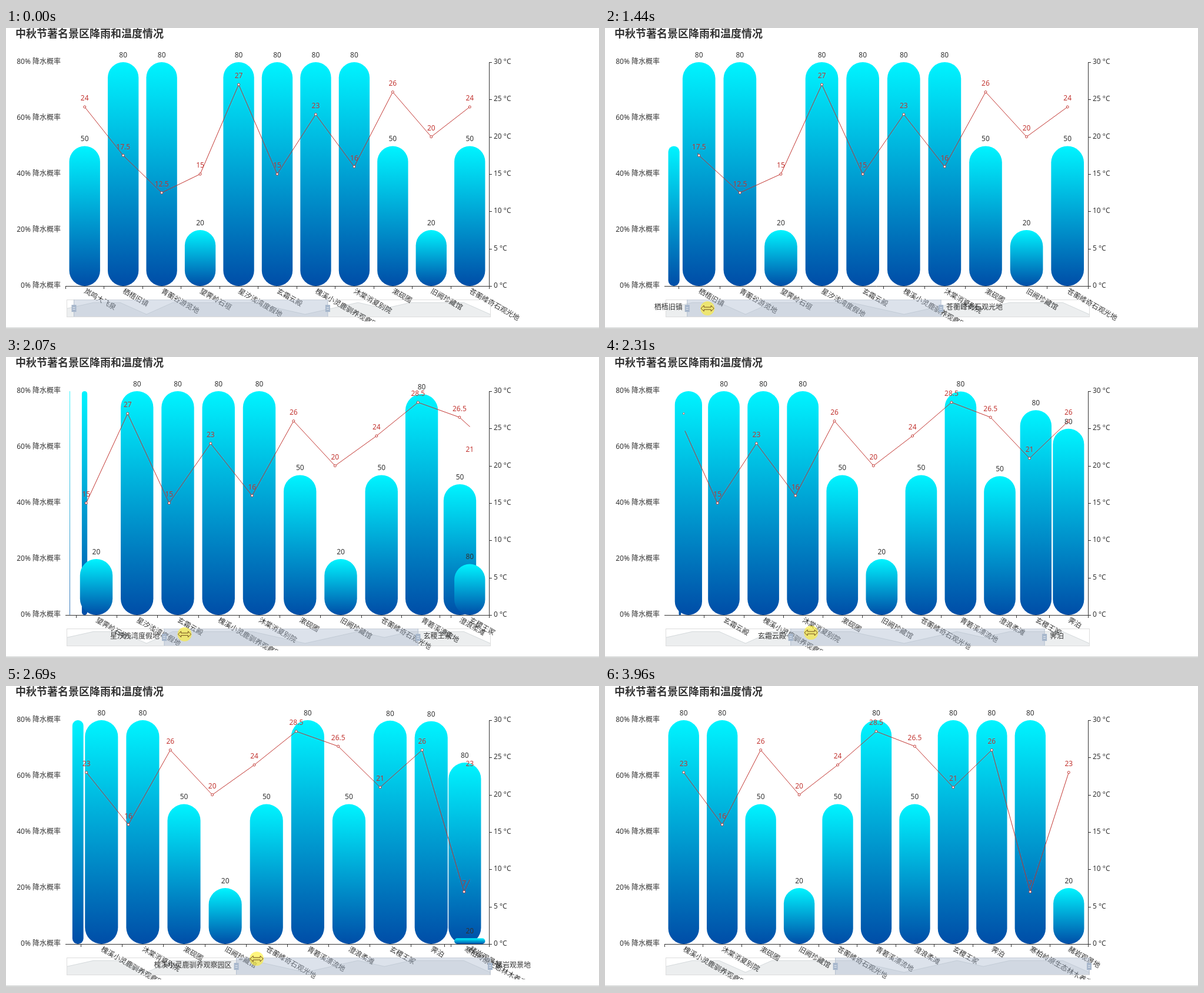
Animation of 1008x511 px, one loop 4.72 s. Source, as an HTML page with a canvas:

```html
<!DOCTYPE html>
<html lang="zh">
<head>
<meta charset="utf-8">
<style>
html, body { margin: 0; width: 100%; height: 100%; overflow: hidden; background: #fff; }
canvas { display: block; }
</style>
</head>
<body>
<canvas id="stage" width="1008" height="511"></canvas>
<script>
const ctx = document.getElementById('stage').getContext('2d');
const LOOP = 4720, UPDATE = 400;
const FONT = '"Noto Sans", "Noto Sans CJK SC", "Noto Sans CJK", sans-serif';
const INK = '#333', RED = '#c23531';
const LEFT = 101, WIDTH = 720, TOP = 58, BASE = 438;
const SLIDER = { x: 104, y: 461, w: 719, h: 29 };

const places = [
  ['岚鸣大飞泉', 50, 24], ['栖梧旧镇', 80, 17.5], ['青蘅谷游览地', 80, 12.5],
  ['望霁岭石垣', 20, 15], ['星汐浅湾度假地', 80, 27], ['玄霜云殿', 80, 15],
  ['槐溪小灵鹿驯养观察园区', 80, 23], ['沐棠消夏别院', 80, 16], ['漱砚圃', 50, 26],
  ['旧阙珍藏馆', 20, 20], ['苍蘅峰奇石观光地', 50, 24], ['青箬溪漂流地', 80, 28.5],
  ['澄浪柔滩', 50, 26.5], ['玄稷王冢', 80, 21], ['霁泊', 80, 26],
  ['寒柏岭原生态林木养育带', 80, 7], ['赭岩观景地', 20, 23]
].map(([name, rain, temp]) => ({ name, rain, temp }));

// [time, first visible place, last visible place]
const views = [
  [-1e4, 0, 10], [1327, 1, 10], [1602, 1, 11], [1768, 2, 12], [1895, 3, 12], [2038, 3, 13],
  [2073, 4, 13], [2124, 4, 14], [2293, 5, 14], [2495, 5, 15], [2571, 6, 15], [2677, 6, 16]
].map(([time, a, b]) => ({ time, a, b }));

// [time, x, y] of the pointer
const pointer = [
  [300, 150, 510], [760, 137, 477], [1060, 138, 477], [1330, 159, 477], [1440, 174, 476],
  [1770, 245, 474], [2310, 350, 468], [2690, 426, 463], [3000, 465, 462], [3160, 483, 462],
  [3480, 549, 462], [3960, 549, 462]
];

const mix = (a, b, p) => a + (b - a) * p;
const clamp = (v, lo, hi) => Math.min(hi, Math.max(lo, v));
const easeOut = v => 1 - (1 - clamp(v, 0, 1)) ** 3;
const band = v => WIDTH / (v.b - v.a + 1);
const slotX = (v, i) => LEFT + band(v) * (i - v.a + .5);
const inView = (v, i) => i >= v.a && i <= v.b;
const tempY = i => BASE - places[i].temp * 380 / 30;

function text(s, x, y, align = 'left', color = INK, font = '12px') {
  ctx.font = `${font} ${FONT}`;
  ctx.textAlign = align;
  ctx.textBaseline = 'middle';
  ctx.fillStyle = color;
  ctx.fillText(s, x, y);
}

function path(points, color, width = 1) {
  ctx.beginPath();
  points.forEach(([x, y]) => ctx.lineTo(x, y));
  ctx.strokeStyle = color;
  ctx.lineWidth = width;
  ctx.stroke();
}

function pointerAt(t) {
  const k = pointer.findIndex(q => q[0] > t);
  if (k < 1) return k ? pointer[pointer.length - 1].slice(1) : pointer[0].slice(1);
  const [t0, x0, y0] = pointer[k - 1], [t1, x1, y1] = pointer[k];
  const p = (t - t0) / (t1 - t0);
  return [mix(x0, x1, p), mix(y0, y1, p)];
}

// Each new view restarts the bars from wherever they are.
function barsAt(t) {
  let live = {};
  const leaving = [];
  views.filter(v => v.time <= t).forEach((v, k) => {
    const until = Math.min(t, views[k + 1] ? views[k + 1].time : t);
    const p = easeOut((until - v.time) / UPDATE);
    const next = {};
    for (let i = v.a; i <= v.b; i++) {
      const goal = { x: slotX(v, i), w: band(v) * .8, h: places[i].rain * 4.75 };
      const from = live[i] || { ...goal, h: 0 };
      next[i] = { x: mix(from.x, goal.x, p), w: mix(from.w, goal.w, p), h: mix(from.h, goal.h, p) };
    }
    for (const i in live) {
      if (!next[i]) leaving.push({ ...live[i], left: 1 - easeOut((t - v.time) / UPDATE) });
    }
    live = next;
  });
  return { live, leaving };
}

function drawBar(x, w, h) {
  if (w < .3 || h < .3) return;
  const fill = ctx.createLinearGradient(0, BASE - h, 0, BASE);
  fill.addColorStop(0, 'rgb(0,244,255)');
  fill.addColorStop(1, 'rgb(0,77,167)');
  ctx.fillStyle = fill;
  ctx.beginPath();
  ctx.roundRect(x, BASE - h, w, h, Math.min(w, h) / 2);
  ctx.fill();
}

function drawAxes(live) {
  for (let k = 0; k <= 4; k++) text(`${k * 20}% 降水概率`, 93, BASE - k * 95, 'right');
  path([[821.5, TOP], [821.5, BASE]], INK);
  for (let k = 0; k <= 6; k++) {
    const y = Math.round(BASE - k * 380 / 6) + .5;
    path([[821, y], [826, y]], INK);
    text(`${k * 5} °C`, 829, y - .5);
  }
  path([[LEFT, BASE + .5], [822, BASE + .5]], INK);
  const tick = x => path([[Math.round(x) + .5, BASE], [Math.round(x) + .5, BASE + 5]], INK);
  tick(821);
  ctx.save();
  ctx.beginPath();
  ctx.rect(0, 0, 1008, 498);
  ctx.clip();
  for (const i in live) {
    tick(live[i].x - live[i].w / 1.6);
    ctx.save();
    ctx.translate(live[i].x, BASE + 8);
    ctx.rotate(Math.PI / 6);
    text(places[i].name, 0, 0);
    ctx.restore();
  }
  ctx.restore();
}

function marker(x, y, scale) {
  if (scale < .05) return;
  ctx.beginPath();
  ctx.arc(x, y, 2 * scale, 0, 7);
  ctx.fillStyle = '#fff';
  ctx.fill();
  ctx.strokeStyle = RED;
  ctx.lineWidth = scale;
  ctx.stroke();
}

// The line always starts from the finished layout of the preceding view.
function drawLine(t) {
  const k = views.filter(v => v.time <= t).length - 1;
  const view = views[k], old = views[k - 1] || view;
  const p = easeOut((t - view.time) / UPDATE);
  const points = [];
  for (let i = view.a; i <= view.b; i++) {
    const x = slotX(view, i), y = tempY(i);
    points.push(inView(old, i)
      ? { i, x: mix(slotX(old, i), x, p), y, scale: 1 }
      : { i, x, y: mix(tempY(i - 1), y, p), scale: p });
  }
  const line = points.map(q => [q.x, q.y]);
  if (old.a < view.a && p < 1) {
    const q = Math.min(1, p * 1.5), x = slotX(old, old.a), y = tempY(old.a);
    line.unshift([mix(x, points[0].x, q * q), mix(y, points[0].y, q)]);
    marker(x, y, clamp(1 - 2 * p, 0, 1));
  }
  path(line, RED);
  for (const { i, x, y, scale } of points) {
    marker(x, y, scale);
    if (scale > .03) text(places[i].temp, x, tempY(i) - 14, 'center', RED);
  }
}

function drawHandle(x) {
  path([[x, SLIDER.y], [x, SLIDER.y + SLIDER.h]], '#b4c0d0');
  ctx.fillStyle = '#a7b7cc';
  ctx.fillRect(x - 4, 470, 8, 12);
  for (const y of [474.5, 477.5]) path([[x - 2, y], [x + 2, y]], '#e4e9f0');
}

function drawSlider(shift, hover) {
  const { x, y, w, h } = SLIDER, step = w / 16;
  const shadow = places.map((q, i) => [x + i * step, 492.7 - q.rain / 3]);
  ctx.beginPath();
  [[x, y + h], ...shadow, [x + w, y + h]].forEach(q => ctx.lineTo(...q));
  ctx.fillStyle = 'rgba(47,69,84,.09)';
  ctx.fill();
  path(shadow, 'rgba(47,69,84,.16)');
  ctx.strokeStyle = '#ddd';
  ctx.strokeRect(x - .5, y + .5, w + 1, h);
  const from = x + shift, to = from + w * .6;
  ctx.fillStyle = 'rgba(167,183,204,.4)';
  ctx.fillRect(from, y, to - from, h);
  drawHandle(from);
  drawHandle(to);
  if (hover) {
    const first = shift / step;
    text(places[Math.round(first)].name, from - 8, 475, 'right');
    text(places[Math.round(first + 9.6)].name, to + 9, 475);
  }
}

function drawPointer([x, y], pressed, hover) {
  if (pressed) {
    ctx.fillStyle = 'rgba(255,238,40,.6)';
    ctx.beginPath();
    ctx.arc(x, y, 12, 0, 7);
    ctx.fill();
  }
  ctx.save();
  ctx.translate(x, y);
  ctx.lineWidth = 1;
  ctx.beginPath();
  const shape = hover
    ? [[-11, 0], [-6, -5], [-6, -2], [6, -2], [6, -5], [11, 0], [6, 5], [6, 2], [-6, 2], [-6, 5]]
    : [[0, 0], [0, 16], [4, 12], [7, 18], [9, 17], [6, 11], [11, 11]];
  shape.forEach(q => ctx.lineTo(...q));
  ctx.closePath();
  if (!pressed) {
    ctx.fillStyle = '#fff';
    ctx.fill();
  }
  ctx.strokeStyle = hover ? '#75501c' : '#222';
  ctx.stroke();
  ctx.restore();
}

function draw(t) {
  ctx.fillStyle = '#fff';
  ctx.fillRect(0, 0, 1008, 511);
  ctx.fillStyle = '#a0a5a3';
  ctx.fillRect(0, 509, 1008, 1);
  text('中秋节著名景区降雨和温度情况', 16, 11, 'left', INK, 'bold 18px');

  const { live, leaving } = barsAt(t);
  drawAxes(live);
  leaving.forEach(b => drawBar(b.x - b.w / 2, b.w * b.left, b.h));
  for (const i in live) {
    const { x, w, h } = live[i];
    drawBar(x - w / 2, w, h);
    text(places[i].rain, x, BASE - h - 11.5, 'center');
  }
  drawLine(t);

  const spot = pointerAt(t), visible = t >= 300 && t < 3960;
  const hover = visible && spot[1] < SLIDER.y + SLIDER.h;
  drawSlider(clamp(spot[0] - 138.5, 0, SLIDER.w * .4), hover);
  if (visible) drawPointer(spot, t >= 900 && t < 3780, hover);
}

const start = performance.now();
function frame() {
  draw((performance.now() - start) % LOOP);
  requestAnimationFrame(frame);
}
frame();
</script>
</body>
</html>
```
